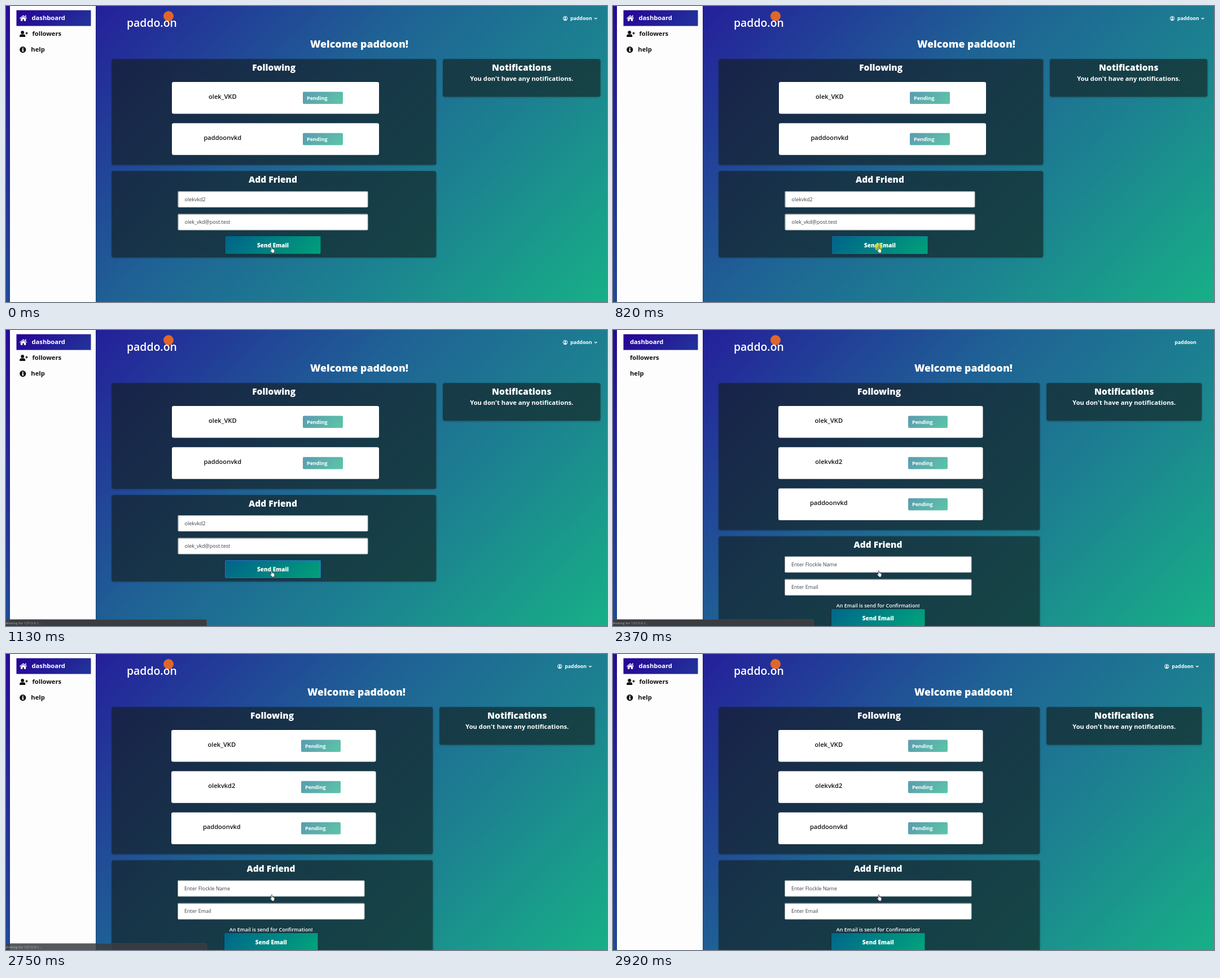
Recreate the animation shown at these times as an HTML page. Size 1065 px wide and 526 px high, loop 3.7 s.

```html
<!DOCTYPE html>
<html lang="en">
<head>
<meta charset="utf-8">
<title>Dashboard</title>
<style>
  html, body { margin: 0; width: 100%; height: 100%; overflow: hidden; background: #1f6295; }
  svg { display: block; width: 100%; height: 100%; }
  text { font-family: "Open Sans", "Noto Sans", sans-serif; white-space: pre; }
  .timed { animation: 3.7s step-end infinite; }
  .before { animation-name: before; }
  .after { animation-name: after; }
  .bare { animation-name: bare; }
  .icons { animation-name: icons; }
  .click { animation-name: click; }
  .focus { animation-name: focus; }
  .status { animation-name: status; }
  @keyframes before { 0% { opacity: 1 } 64.054% { opacity: 0 } }
  @keyframes after { 0% { opacity: 0 } 64.054% { opacity: 1 } }
  @keyframes bare { 0% { opacity: 0 } 64.054% { opacity: 1 } 66.216% { opacity: 0 } }
  @keyframes icons { 0% { opacity: 1 } 64.054% { opacity: 0 } 66.216% { opacity: 1 } }
  @keyframes click { 0% { opacity: 0 } 20.27% { opacity: 1 } 24.324% { opacity: 0 } }
  @keyframes focus { 0% { opacity: 0 } 22.162% { opacity: .5 } 24.324% { opacity: 1 } }
  @keyframes status {
    0% { opacity: 0 } 30.541% { opacity: 1 } 74.324% { opacity: .85 }
    76.486% { opacity: .4 } 78.919% { opacity: 0 }
  }
</style>
</head>
<body>
<svg id="stage" viewBox="0 0 1065 526"></svg>
<script>
const user = 'paddoon';
const rowPitch = 73.2;

const rect = (x, y, w, h, fill, extra = '') =>
  `<rect x="${x}" y="${y}" width="${w}" height="${h}" fill="${fill}" ${extra}/>`;

const text = (x, y, size, weight, str, { fill = '#fff', anchor = 'middle' } = {}) =>
  `<text x="${x}" y="${y}" font-size="${size}" font-weight="${weight}" fill="${fill}" text-anchor="${anchor}">${str}</text>`;

const left = (fill = '#fff') => ({ fill, anchor: 'start' });

const timed = (name, content) => `<g class="timed ${name}">${content}</g>`;

// Gradient at 135 degrees across a box, as in CSS
function gradient(id, x, y, w, h, stops) {
  const cx = x + w / 2, cy = y + h / 2, reach = (w + h) / 4;
  const list = stops.map(([at, color]) => `<stop offset="${at}" stop-color="${color}"/>`).join('');
  return `<linearGradient id="${id}" gradientUnits="userSpaceOnUse" x1="${cx - reach}" y1="${cy - reach}"
    x2="${cx + reach}" y2="${cy + reach}">${list}</linearGradient>`;
}

const panel = (x, y, w, h) =>
  rect(x, y, w, h, 'rgb(24,36,34)', 'fill-opacity=".55" rx="4" filter="url(#shadow)"');

function card(layout, name, i) {
  const y = 135 + i * rowPitch;
  const { cardX, cardW, nameX, pendX, pendW } = layout;
  return rect(cardX, y, cardW, 56.5, '#fff', 'rx="3"') +
    text(nameX, y + 30, 11.1, 600, name, { fill: '#111' }) +
    `<g transform="translate(${pendX} ${y + 17.5})">` +
    rect(0, 0, pendW, 21.5, 'url(#pending)', 'rx="2"') +
    text(7, 14.4, 9.1, 700, 'Pending', left()) + '</g>';
}

const input = (x, y, w, str) =>
  rect(x + .5, y + .5, w - 1, 28, '#fff', 'rx="1.5" stroke="#c4c8ca"') +
  `<path d="M${x + .5} ${y + 28}v-27.5h${w - 1}" fill="none" stroke="#8b9093"/>` +
  text(x + 12, y + 17.6, 9, 400, str, left('#3c4146'));

function page(layout) {
  const { panelW, sideX, sideW, welcomeX, headX, formX, formY, names, inputX, inputW, values } = layout;
  const sideMid = sideX + sideW / 2;
  return panel(187, 94, panelW, formY - 104.5) +
    panel(187, formY, panelW, 154 + (names.length - 2) * 40) +
    panel(sideX, 94, sideW, 67.5) +
    text(welcomeX, 74, 17.75, 800, `Welcome ${user}!`) +
    text(headX, 115, 15.55, 800, 'Following') +
    text(sideMid, 115, 15.55, 800, 'Notifications') +
    text(sideMid, 133.2, 11.2, 700, "You don't have any notifications.") +
    names.map((name, i) => card(layout, name, i)).join('') +
    text(formX, formY + 20.8, 15.55, 800, 'Add Friend') +
    values.map((value, i) => input(inputX, formY + 36 + i * 40.5, inputW, value)).join('');
}

const sendButton = (x, y, w, fill) =>
  rect(x, y, w, 31.5, fill, 'rx="1.5" filter="url(#shadow)"') +
  text(x + w / 2, y + 19.7, 10, 800, 'Send Email');

const account = x => `<g transform="translate(${x} 22)">
  <circle r="3.7" fill="none" stroke="#fff" stroke-width="1"/>
  <circle cy="-1" r="1.5" fill="#fff"/>
  <path d="M-2.7 2.6a2.8 2.1 0 0 1 5.4 0a4 4 0 0 1-5.4 0z" fill="#fff"/>
  <path d="M51.8-1l2.2 2.2 2.2-2.2" fill="none" stroke="#fff" stroke-width="1.2"/></g>` +
  text(x + 9, 25.4, 8.75, 700, user, left());

const menu = xs => ['dashboard', 'followers', 'help'].map((item, i) =>
  text(xs[i], 25.2 + i * 28.1, 11.2, 700, item, left(i ? '#111' : '#fff'))).join('');

const menuIcons = `
  <path d="M24 21.8l6.6-5.6 6.6 5.6-.8.9-5.8-4.9-5.8 4.9zM34 16.6h1.6v3.2l-1.6-1.4z" fill="#fff"/>
  <path d="M26 22.6l4.6-3.9 4.6 3.9v4.1h-3.3v-3.1h-2.6v3.1H26z" fill="#fff"/>
  <g fill="#111"><circle cx="29.2" cy="46.9" r="2.9"/>
  <path d="M24.2 55v-1.7q0-3 3-3h4q3 0 3 3V55zM34.2 47.8h1.7v-1.7h1.3v1.7h1.7v1.3h-1.7v1.7h-1.3v-1.7h-1.7z"/>
  <circle cx="29.8" cy="77.6" r="5.6"/></g>
  <path d="M28.9 74h1.9v1.8h-1.9zM28.3 76.6h2.5v3.2h.6v1.1h-3.1v-1.1h.6v-2.1h-.6z" fill="#fff"/>`;

const sidebar = rect(7, 0, 152, 526, '#fdfdfe', 'filter="url(#shadow)"') +
  rect(18.5, 7.5, 132, 28, 'url(#active)') +
  timed('icons', menuIcons + menu([45.5, 46.5, 44.3])) +
  timed('bare', menu([30, 30, 30]));

const logo = '<circle cx="288" cy="18" r="9" fill="#e0672a"/>' +
  text(214, 37.3, 19.4, 600, 'paddo.on', left());

const hand = `<path transform="translate(467.5 427.5)" stroke="#222" stroke-width=".7" stroke-linejoin="round" fill="#fff"
  d="M2.4 6.4V1.2q0-1 .9-1t.9 1v3.1q1-.5 1.5.3q1-.3 1.4.4q1.2-.1 1.2 1v2.3q0 1-.7 1.9v1.2H3.5v-1L.5 7.1q-.5-1 .4-1.2q.7 0 1.5 1.1z"/>`;

const statusBar = rect(-2, 514.5, 357.5, 14, '#3b3c3f', 'rx="1.5" stroke="#4d4f53" stroke-width=".6"') +
  text(-.8, 522.8, 6.15, 400, 'Waiting for 127.0.0.1...', left('#adb0b4'));

const first = {
  panelW: 575.5, sideX: 774, sideW: 279.5, welcomeX: 626, headX: 474.7, formX: 473, formY: 293,
  cardX: 294, cardW: 367, nameX: 383.8, pendX: 526, pendW: 71, inputX: 304.5, inputW: 337,
  names: ['olek_VKD', user + 'vkd'], values: ['olekvkd2', 'olek_vkd@post.test'],
};
const second = {
  panelW: 569.5, sideX: 768, sideW: 275.5, welcomeX: 621, headX: 471.6, formX: 469.5, formY: 366.2,
  cardX: 293, cardW: 362.5, nameX: 382.3, pendX: 523, pendW: 70, inputX: 304, inputW: 331.5,
  names: ['olek_VKD', 'olekvkd2', user + 'vkd'], values: ['Enter Flockle Name', 'Enter Email'],
};

const defs = `<defs>
  <filter id="shadow" x="-10%" y="-20%" width="120%" height="150%">
    <feDropShadow dx="0" dy="1" stdDeviation="1.5" flood-color="#000" flood-opacity=".35"/></filter>` +
  gradient('backdrop', 0, 0, 1065, 526,
    [[0, '#280a98'], [.12, '#24239a'], [.45, '#1f6295'], [.72, '#1c8490'], [1, '#17b087']]) +
  gradient('active', 18.5, 7.5, 132, 28, [[0, '#260496'], [1, '#22359a']]) +
  gradient('pending', 0, 0, 71, 21.5, [[0, '#5b9bb1'], [1, '#5cc6a6']]) +
  gradient('sendFirst', 388.5, 409, 169, 31.5, [[0, '#04638a'], [1, '#01a079']]) +
  gradient('sendSecond', 387, 496, 165.5, 31.5, [[0, '#04668b'], [1, '#01a57c']]) + '</defs>';

document.getElementById('stage').innerHTML = defs +
  rect(0, 0, 1065, 526, 'url(#backdrop)') + sidebar + logo +
  timed('before', page(first) + sendButton(388.5, 409, 169, 'url(#sendFirst)') + account(991) +
    timed('focus', rect(388.5, 409.5, 169, 31, 'none', 'stroke="#2b70c2" rx="1"')) +
    timed('click', '<circle cx="470.5" cy="428" r="7" fill="#d5d81c" fill-opacity=".72"/>')) +
  timed('after', page(second) +
    text(469.7, 492.6, 9, 600, 'An Email is send for Confirmation!') +
    sendButton(387, 496, 165.5, 'url(#sendSecond)') +
    timed('icons', account(981.3)) +
    timed('bare', text(995.3, 25.2, 8.75, 700, user, left()))) +
  timed('status', statusBar) + hand;
</script>
</body>
</html>
```
